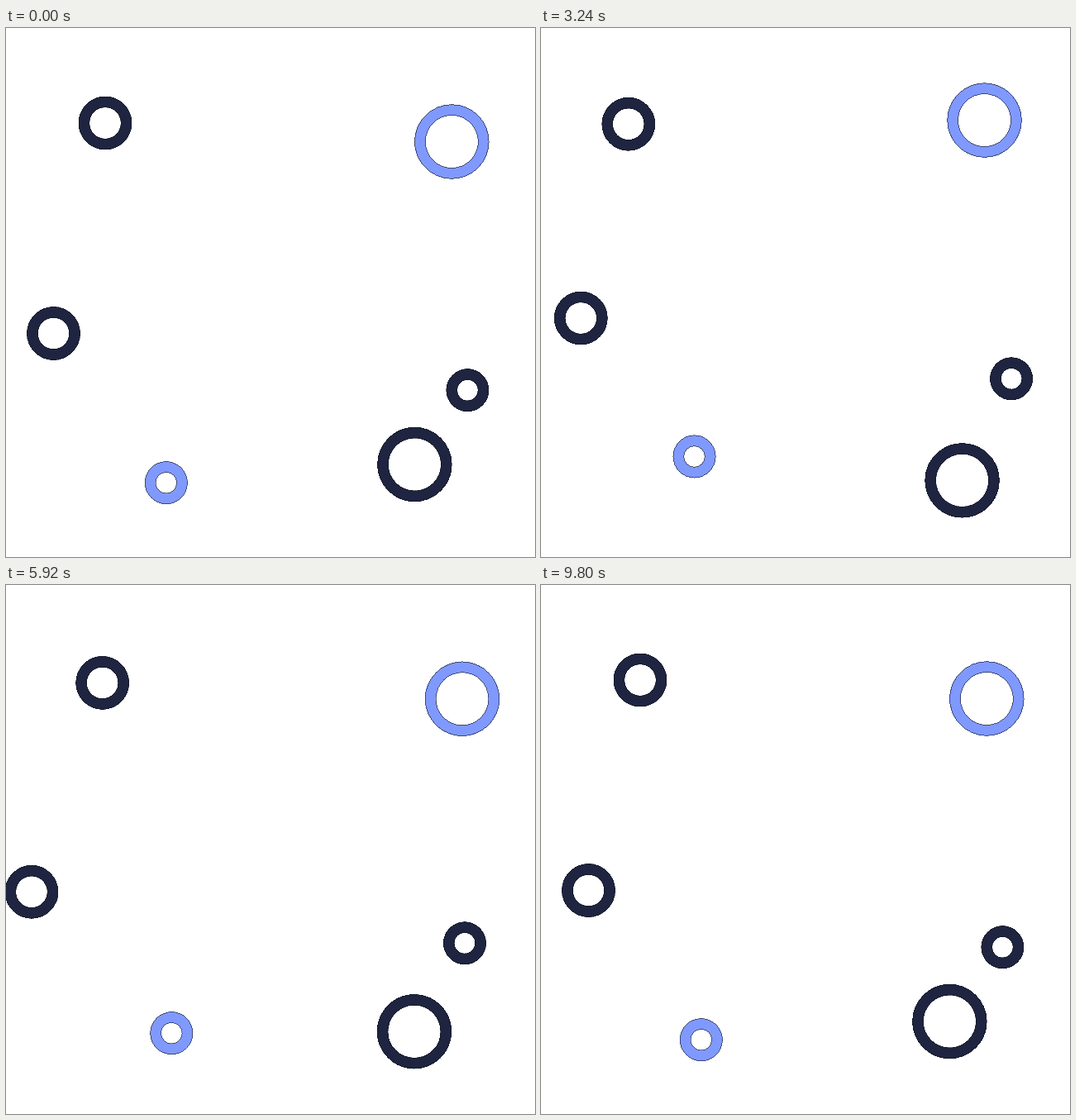
An HTML page that plays this animation: 640 px wide and 640 px high, repeating every 9.88 s.

```html
<!DOCTYPE html>
<html lang="en">
<head>
<meta charset="utf-8">
<title>Drifting rings</title>
<style>
  html, body { margin: 0; width: 100%; height: 100%; overflow: hidden; background: #fff; }
  svg { display: block; width: 640px; height: 640px; }
</style>
</head>
<body>
<svg id="stage" viewBox="0 0 640 640" fill="none" shape-rendering="crispEdges"></svg>
<script>
const stage = document.getElementById('stage');
const LOOP = 9880, STEP = 40;
const KEYS = [0, 2500, 4960, 7400, 9800];
const NAVY = '#1f2540', BLUE = '#8099ff', EDGE = '#10131f';
const RADIUS = 25.6, BAND = 13.4, HAIRLINE = 0.6;

// Each ring eases between four stops; its sway bends the legs to alternate sides.
const rings = [
  { color: NAVY, scale: 1, sway: [-2.4, -1.5],
    stops: [[120, 115], [98, 112.6], [127, 125], [103, 109.6]] },
  { color: BLUE, scale: 1.5, sway: [0.4, 1.9],
    stops: [[539.3, 137.5], [530, 103.7], [561.2, 145.5], [533.3, 118]] },
  { color: NAVY, scale: 1, sway: [0, 1.6],
    stops: [[57.5, 369.5], [55.7, 346], [21.6, 373.7], [49, 362.5]] },
  { color: NAVY, scale: 0.75, sway: [0, 0],
    stops: [[558.4, 438.2], [574.8, 420.5], [548.5, 438], [567.4, 424.3]] },
  { color: NAVY, scale: 1.5, sway: [4.4, 0],
    stops: [[494.4, 528], [521.5, 548.6], [479.3, 543], [510.8, 535]] },
  { color: BLUE, scale: 0.75, sway: [3.1, 5.2],
    stops: [[193.8, 550.2], [183, 516.5], [203.6, 540.7], [186, 531.7]] }
];

const circle = (r, width, color) =>
  `<circle r="${r}" stroke-width="${width}" stroke="${color}"/>`;

function ringMarkup({ color, scale }) {
  const r = RADIUS * scale, rim = (BAND - HAIRLINE) / 2;
  return '<g>' + circle(r, BAND, color) +
    circle(r - rim, HAIRLINE, EDGE) + circle(r + rim, HAIRLINE, EDGE) + '</g>';
}

stage.innerHTML = rings.map(ringMarkup).join('');

function legAt(time) {
  const leg = Math.max(0, KEYS.findIndex(key => key >= time) - 1);
  const u = (time - KEYS[leg]) / (KEYS[leg + 1] - KEYS[leg]);
  return { leg, s: u * u * (3 - 2 * u) };
}

function position({ stops, sway }, { leg, s }) {
  const from = stops[leg], to = stops[(leg + 1) % stops.length];
  const swing = Math.sin(Math.PI * (leg + s));
  return from.map((a, axis) => a + (to[axis] - a) * s + sway[axis] * swing);
}

function render(elapsed) {
  const time = Math.floor((elapsed % LOOP) / STEP) * STEP;
  const pose = legAt(Math.min(time, KEYS[4]));
  rings.forEach((ring, i) =>
    stage.children[i].setAttribute('transform', `translate(${position(ring, pose)})`));
}

const start = performance.now();
function tick() {
  render(performance.now() - start);
  requestAnimationFrame(tick);
}
tick();
</script>
</body>
</html>
```
